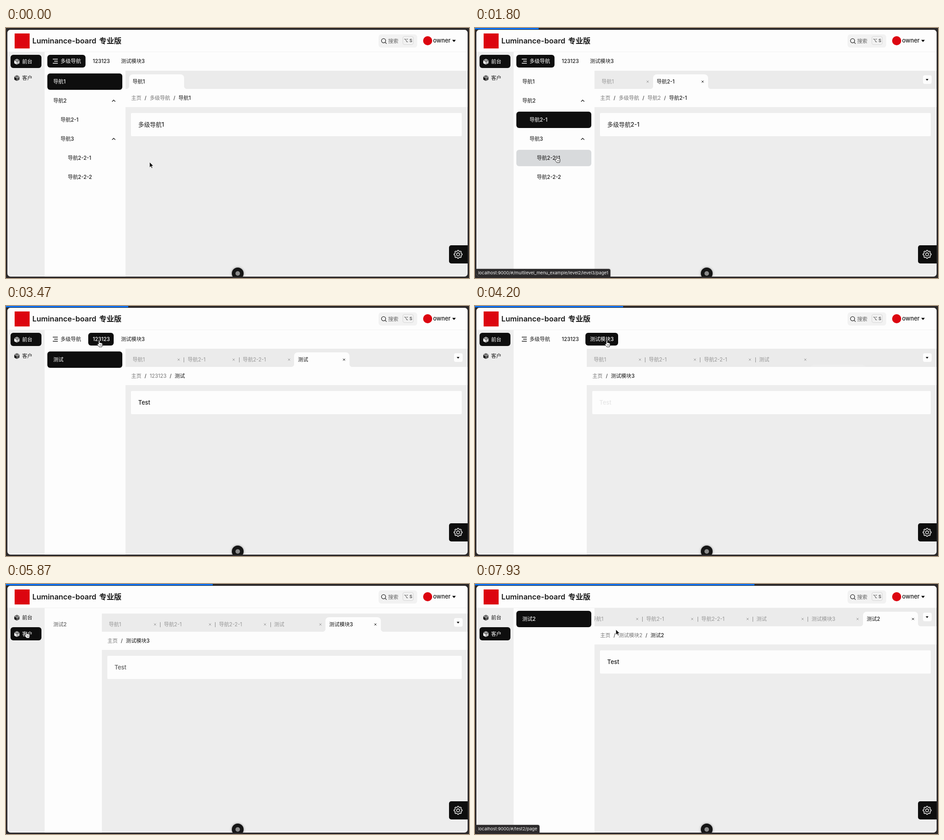
Animation of 1019 by 550 pixels, one loop 8000 ms. Source, as an HTML page:

```html
<!DOCTYPE html>
<html lang="zh-CN">
<head>
<meta charset="utf-8">
<title>多级导航</title>
<style>
  html, body { margin: 0; width: 100%; height: 100%; overflow: hidden; background: #2b2829; }
  #stage { position: relative; width: 1019px; height: 550px; overflow: hidden;
    font: 500 11.3px/20px Inter, "Noto Sans CJK SC", "Noto Sans CJK", sans-serif; color: #1a1a1a; }
  #stage div, #stage svg, #stage b, #stage i { position: absolute; white-space: nowrap; font-style: normal; }
  #win { inset: 0; background: #ededed; clip-path: inset(4px 3px 3px round 7px); }
  .white { background: #fdfdfd; }
  #head { left: 0; top: 0; width: 1019px; height: 53px; border-bottom: 1px solid #f1f1f1; box-sizing: border-box; }
  #logo { left: 19px; top: 12px; width: 33px; height: 33px; background: #dc0510; }
  .name { top: 18px; font-size: 16.4px; font-weight: 600; }
  #search { left: 820px; top: 14px; width: 85px; height: 29px; border-radius: 6px; background: #f2f2f2; color: #666; }
  #key { left: 53px; top: 4px; width: 24px; height: 19px; border: 1px solid #d6d6d6; border-radius: 4px;
    box-sizing: border-box; font: 500 9.5px/17px Inter, "DejaVu Sans", sans-serif; color: #333; text-align: center; }
  #face { left: 918px; top: 18px; width: 20px; height: 20px; border-radius: 50%; background: #dc0510; }
  #user { left: 940px; top: 18px; font-size: 12.9px; }
  .caret { border: solid transparent; border-width: 5px 4.5px 0; border-top-color: #111; }

  .item { border-radius: 6px; }
  .item.hov { background: #d8dadc; }
  .item.on { background: #0e0e0e; color: #fdfdfd; }
  #nav { left: 85px; top: 53px; right: 0; height: calc(var(--T) - 53px); overflow: hidden; }
  #side { left: 85px; top: var(--T); width: calc(var(--L) - 85px); bottom: 0; overflow: hidden; }
  #main { left: var(--L); top: var(--T); right: 3px; bottom: 0; }
  #tabs { left: 0; top: 0; right: 0; height: 40px; overflow: hidden; background: #ebebeb; }
  #strip { left: 7.5px; top: 0; transform: translateX(var(--S)); }
  .tab { top: 8px; width: 121.3px; height: 32px; color: #979797; font-weight: 400; }
  .tab > i { left: 8px; top: 6px; }
  .tab > svg { left: 106.5px; top: 13px; }
  .tab > b { left: -.5px; top: 11px; width: 1px; height: 11px; background: #8a8a8a; }
  .tab.on { background: #fdfdfd; border-radius: 8px 8px 0 0; color: #1a1a1a; font-weight: 500; }
  .tab.on::before, .tab.on::after { content: ""; position: absolute; bottom: 0; width: 6px; height: 6px; }
  .tab.on::before { left: -6px; background: radial-gradient(circle at 0 0, transparent 5.7px, #fdfdfd 6.2px); }
  .tab.on::after { right: -6px; background: radial-gradient(circle at 100% 0, transparent 5.7px, #fdfdfd 6.2px); }
  #more { right: 11px; top: 10px; width: 19px; height: 19px; border-radius: 4px; }
  #more .caret { left: 6px; top: 8px; border-width: 4px 3.5px 0; }
  #crumbs { left: 0; top: 40px; right: 0; height: 40px; }
  #path { left: 12.5px; top: 10px; font-weight: 400; color: #777; }
  #path span { color: #222; margin: 0 7px; }
  #path em { font-style: normal; font-weight: 500; color: #1a1a1a; }
  #card { left: 12px; top: 93px; right: 13px; height: 51px; border-radius: 2px; }
  #text { left: 16px; top: 16px; font-size: 12.9px; }

  #gear { left: 975px; top: 478px; width: 44px; height: 40px; border-radius: 5px 0 0 5px; background: #0e0e0e; }
  #knob { left: 496.5px; top: 527px; width: 26px; height: 26px; border-radius: 50%; background: #151515; box-shadow: 0 0 5px #0006; }
  #knob i { left: 8px; top: 8px; width: 10px; height: 10px; border-radius: 50%; background: #8b8b8b; }
  #status { left: 3px; top: 530px; height: 17px; padding: 0 5px 0 4px; border-radius: 0 4px 0 0; background: #2d2b2c;
    color: #f4f4f4; font-size: 9.6px; font-weight: 400; line-height: 17px; box-shadow: 0 0 3px #0005; }
  #bar { left: 0; top: 0; height: 3px; background: #0670f5; }
  #arrow, #hand { left: 0; top: 0; overflow: visible; }
</style>
</head>
<body>
<div id="stage">
  <div id="win">
    <div id="rail"></div>
    <div id="nav" class="white"></div>
    <div id="side" class="white"></div>
    <div id="main">
      <div id="tabs"><div id="strip"></div><div id="more" class="white"><div class="caret"></div></div></div>
      <div id="crumbs" class="white"><div id="path"></div></div>
      <div id="card" class="white"><div id="text"></div></div>
    </div>
    <div id="head" class="white">
      <div id="logo"></div>
      <div class="name" style="left:58px">Luminance-board</div>
      <div class="name" style="left:205px">专业版</div>
      <div id="search">
        <svg width="14" height="14" style="left:5px;top:8px" fill="none" stroke="#222" stroke-width="1.3"><circle cx="6" cy="6" r="4.6"/><path d="M9.4 9.4L12.6 12.6"/></svg>
        <div style="left:21px;top:5px">搜索</div>
        <div id="key">⌥ S</div>
      </div>
      <div id="face"></div>
      <div id="user">owner</div>
      <div class="caret" style="left:982px;top:26px"></div>
    </div>
    <div id="gear"></div>
    <div id="knob"><i></i></div>
    <div id="status"></div>
  </div>
  <div id="bar"></div>
  <svg id="arrow" width="12" height="18"><path d="M0 0V12L2.8 9.5L4.6 13.6L6.6 12.7L4.8 8.7H8.6Z" fill="#111" stroke="#fff" stroke-width=".8"/></svg>
  <svg id="hand" width="14" height="18"><path d="M-1.2 8V1Q-1.2 -.4 0 -.4T1.2 1V5Q2.4 4 3.4 5.2Q4.6 4.6 5.4 5.8Q7.2 5.4 7.2 7.2V10Q7 12 6 14H0Q-1.6 11.4 -4 8.6Q-4.4 7 -2.8 7.2Z" fill="#fff" stroke="#222" stroke-width="1"/><path d="M1.4 8.2V11.4M3.2 8.2V11.4M5 8.2V11.4" stroke="#333" stroke-width=".7"/></svg>
</div>
<script>
const LOOP = 8000, FRAME = 1000 / 15, PITCH = 121.3;
const $ = id => document.getElementById(id);

// label, text offset, foldable
const levels = [['导航1', 13], ['导航2', 13, 1], ['导航2-1', 29], ['导航3', 29, 1], ['导航2-2-1', 45], ['导航2-2-2', 45]];
const tabNames = ['导航1', '导航2-1', '导航2-2-1', '测试', '测试模块3', '测试2'];
const navs = [['多级导航', 91, 84, 29], ['123123', 181, 56, 10], ['测试模块3', 243, 72, 10]];

const scene = (at, rail, nav, menu, on, tabs, crumbs, text, L = 263, T = 94, S = 0) =>
  ({ at, rail, nav, menu, on, tabs, crumbs, text, L, T, S });
const scenes = [
  scene(0, 0, 0, levels, 0, 1, '主页/多级导航/导航1', '多级导航1'),
  scene(780, 0, 0, levels, 2, 2, '主页/多级导航/导航2/导航2-1', '多级导航2-1'),
  scene(2030, 0, 0, levels, 4, 3, '主页/多级导航/导航2/导航3/导航2-2-1', '多级导航2-2-1'),
  scene(3160, 0, 1, [['测试', 13]], 0, 4, '主页/123123/测试', 'Test'),
  scene(4150, 0, 2, [], -1, 5, '主页/测试模块3', 'Test', 85),
  scene(5700, 1, -1, [['测试2', 13]], -1, 5, '主页/测试模块3', 'Test', 263, 53),
  scene(7060, 1, -1, [['测试2', 13]], 0, 6, '主页/测试模块2/测试2', 'Test', 263, 53, -23)
];

const base = 'localhost:9000/#/', multi = base + 'multilevel_menu_example/';
const links = [
  [560, 1000, multi + 'level2/page'],
  [1350, 2400, multi + 'level2/level3/page1'],
  [2550, 2950, multi + 'page'],
  [6720, LOOP, base + 'test2/page']
];

// time, x, y of the pointer tip
const track = [
  [0, 316, 295], [70, 316, 295], [560, 172, 203], [1000, 172, 203], [1500, 180, 282], [2150, 180, 282],
  [2670, 198, 105], [3060, 205, 76], [3550, 205, 76], [4000, 290, 76], [5000, 290, 76],
  [5560, 45, 105], [6050, 45, 105], [6600, 178, 84], [7800, 178, 84], [7930, 310, 100]
];

const clamp = v => Math.max(0, Math.min(1, v));
const ease = v => v * v * (3 - 2 * v);
const mix = (a, b, k) => a + (b - a) * k;

let hits = [];
function item(x, y, w, h, on, inner, dx = 0, dy = 0) {
  const el = document.createElement('div');
  el.className = 'item' + (on ? ' on' : '');
  el.style.cssText = `left:${x - dx}px;top:${y - dy}px;width:${w}px;height:${h}px`;
  el.innerHTML = inner;
  hits.push({ el, x, y, w, h });
  return el;
}
const label = (s, x, h) => `<div style="left:${x}px;top:${h / 2 - 10}px">${s}</div>`;
const cube = `<svg width="14" height="14" style="left:7px;top:8px" fill="currentColor">
  <path d="M7 .5L12.6 3.5L7 6.6L1.4 3.5Z" opacity=".6"/><path d="M1.2 4.2L6.7 7.2V13.5L1.2 10.4Z"/>
  <path d="M12.8 4.2L7.3 7.2V13.5L12.8 10.4Z" opacity=".75"/></svg>`;
const bars = `<svg width="14" height="12" style="left:11px;top:8px" stroke="currentColor" stroke-width="1.5">
  <path d="M1 1.5H12M4 6H12M1 10.5H12"/></svg>`;
const fold = `<svg width="10" height="8" style="left:141px;top:14px" fill="none" stroke="#222" stroke-width="1.4"><path d="M1.5 6L5 2.5L8.5 6"/></svg>`;
const cross = `<svg width="6" height="6" stroke="currentColor"><path d="M.7 .7L5.3 5.3M5.3 .7L.7 5.3"/></svg>`;

function build(s) {
  hits = [];
  $('rail').replaceChildren(...['前台', '客户'].map((n, i) =>
    item(10, 59 + i * 36, 67.5, 29, i === s.rail, cube + label(n, 25.5, 29))));
  $('nav').replaceChildren(...(s.nav < 0 ? [] : navs.map(([n, x, w, tx], i) =>
    item(x, 59, w, 28, i === s.nav, (i ? '' : bars) + label(n, tx, 28), 85, 53))));
  $('side').replaceChildren(...s.menu.map(([n, tx, folds], i) =>
    item(91, s.T + 5.5 + i * 42.1, 165, 36, i === s.on, label(n, tx, 36) + (folds ? fold : ''), 85, s.T)));
  const last = s.tabs - 1;
  $('strip').innerHTML = tabNames.slice(0, s.tabs).map((n, i) =>
    `<div class="tab${i === last ? ' on' : ''}" style="left:${i * PITCH}px"><i>${n}</i>` +
    (last ? cross : '') + (i && i < last ? '<b></b>' : '') + '</div>').join('');
  $('more').style.display = last ? '' : 'none';
  const parts = s.crumbs.split('/');
  const end = parts.pop();
  $('path').innerHTML = [...parts, `<em>${end}</em>`].join('<span>/</span>');
  $('text').textContent = s.text;
}

function pointer(t) {
  const i = track.findIndex(p => p[0] > t);
  if (i < 0) return track[track.length - 1].slice(1);
  const [a, b] = [track[i - 1], track[i]];
  const k = ease((t - a[0]) / (b[0] - a[0]));
  return [mix(a[1], b[1], k), mix(a[2], b[2], k)];
}

let shown = -1;
function render(t) {
  const n = scenes.findLastIndex(s => s.at <= t);
  const s = scenes[n], prev = scenes[Math.max(0, n - 1)];
  if (n !== shown) build(s), shown = n;
  const k = n ? ease(clamp((t - s.at) / 260)) : 1;
  for (const v of ['L', 'T', 'S']) $('stage').style.setProperty('--' + v, mix(prev[v], s[v], k) + 'px');
  $('text').style.opacity = k;
  $('side').style.setProperty('color', s.menu === prev.menu ? '' : `rgba(26,26,26,${k})`);
  if (s.tabs > prev.tabs) {
    const tab = $('strip').lastElementChild;
    tab.style.opacity = k;
    tab.style.transform = `translateY(${30 * (1 - k)}px)`;
  }

  const [x, y] = pointer(t);
  let over = false;
  for (const h of hits) {
    const inside = x >= h.x && x <= h.x + h.w && y >= h.y && y <= h.y + h.h;
    h.el.classList.toggle('hov', inside);
    over = over || inside;
  }
  $('hand').style.display = over ? '' : 'none';
  $('arrow').style.display = over ? 'none' : '';
  $('hand').style.transform = $('arrow').style.transform = `translate(${x}px,${y}px)`;

  const link = links.find(([from, to]) => t >= from && t < to);
  $('status').style.display = link ? '' : 'none';
  $('status').textContent = link ? link[2] : '';
  $('bar').style.width = t / FRAME * 5.172 + 'px';
}

function drawGear() {
  const pts = [];
  for (let i = 0; i < 8; i++)
    for (const [d, r] of [[-14, 7.2], [-8, 9], [8, 9], [14, 7.2]]) {
      const a = (i * 45 + d) * Math.PI / 180;
      pts.push((20 + r * Math.sin(a)).toFixed(2) + ',' + (20 - r * Math.cos(a)).toFixed(2));
    }
  $('gear').innerHTML = `<svg width="40" height="40" fill="none" stroke="#f4f4f4" stroke-width="1.4" stroke-linejoin="round">
    <polygon points="${pts.join(' ')}"/><circle cx="20" cy="20" r="3.3"/></svg>`;
}

drawGear();
const start = performance.now();
function tick() {
  const t = (performance.now() - start) % LOOP;
  render(Math.min(119, Math.floor((t + 3.4) / FRAME)) * FRAME);
  requestAnimationFrame(tick);
}
tick();
</script>
</body>
</html>
```
